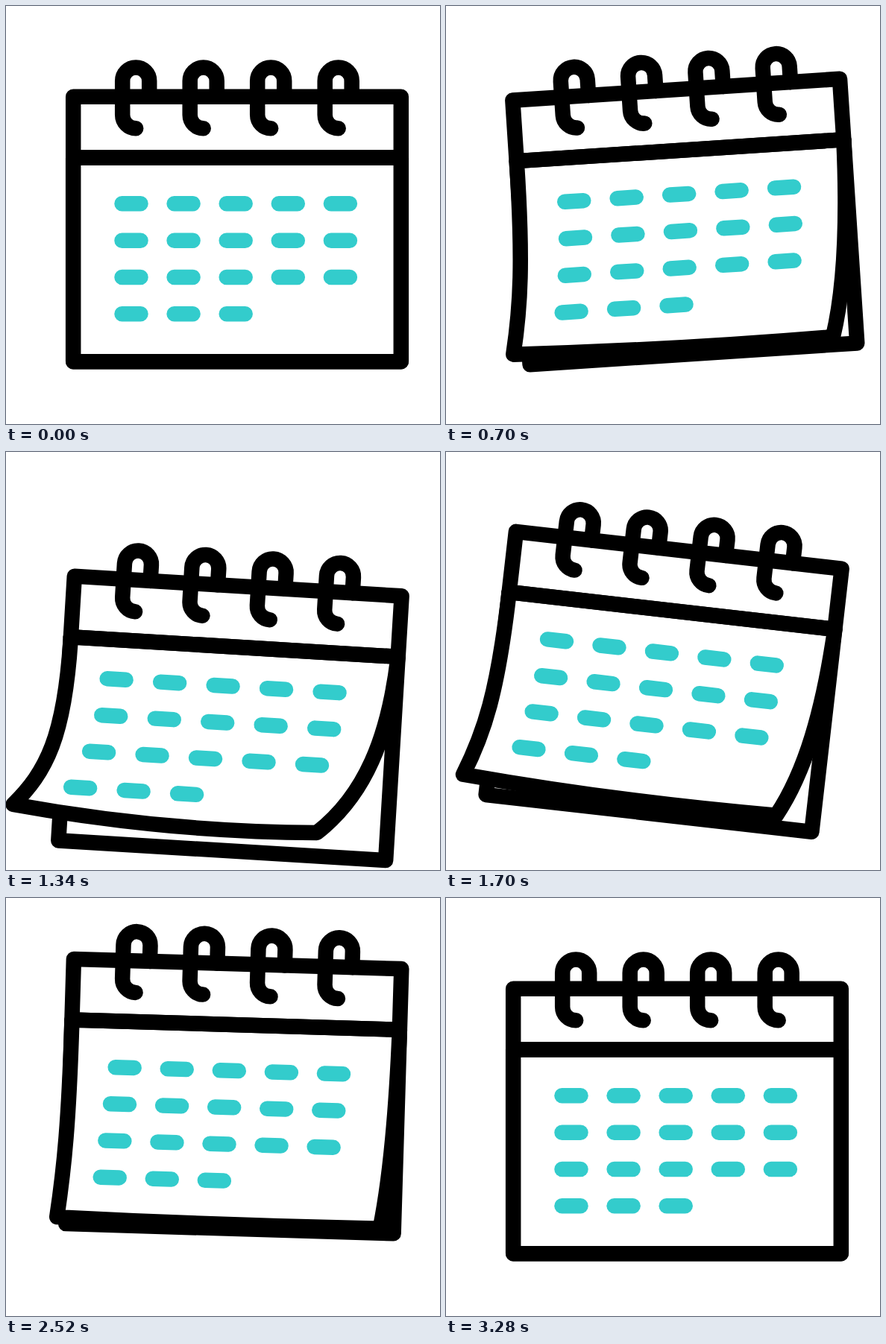
Write an HTML page that moves like this. It is 582x561 px and loops after 3.6 s.

```html
<!DOCTYPE html>
<html lang="en">
<head>
<meta charset="utf-8">
<title>Calendar</title>
<style>
  html, body { margin: 0; width: 100%; height: 100%; overflow: hidden; background: #fff; }
  svg { display: block; width: 100%; height: 100%; }
  .ink { fill: none; stroke: #000; stroke-width: 20.5; stroke-linecap: round; stroke-linejoin: round; }
  .paper { fill: #fff; }
  .day { stroke: #3cc; stroke-width: 20.5; stroke-linecap: round; }
</style>
</head>
<body>
<svg viewBox="0 0 582 561">
  <g id="calendar">
    <rect class="ink paper" x="90.2" y="121.8" width="439.6" height="355.4"/>
    <path id="page" class="ink paper"/>
    <g id="days"></g>
    <path class="ink" d="M90.2 203.5H529.8"/>
    <g id="rings"></g>
  </g>
</svg>
<script>
const LOOP = 3600;
const PIVOT = { x: 310, y: 142 };
const LEFT = 90.2, RIGHT = 529.8, FOLD = 203.5, BOTTOM = 477.2;

// [time, value] steps, eased in and out between neighbours
const RISE = [[0, 0], [400, -44], [1200, 64], [2200, -44], [3200, 0]];
const TILT = [[0, 0], [400, -6.95], [1200, 3.1], [2200, 9.9], [2800, -4.9], [3200, 0]];
const LIFT = [[400, 0], [1200, 1.33], [2200, 0]];
const SWAY = [[2200, 0], [2800, 0.44], [3280, 0]];

const $ = id => document.getElementById(id);
const mix = (a, b, k) => a + (b - a) * k;

function add(parent, className, d) {
  const path = document.createElementNS('http://www.w3.org/2000/svg', 'path');
  path.setAttribute('class', className);
  path.setAttribute('d', d);
  return parent.appendChild(path);
}

function valueAt(steps, t) {
  const next = steps.findIndex(([time]) => time > t);
  if (next === 0) return steps[0][1];
  if (next < 0) return steps[steps.length - 1][1];
  const [t0, a] = steps[next - 1], [t1, b] = steps[next];
  const u = (t - t0) / (t1 - t0);
  return mix(a, b, u * u * (3 - 2 * u));
}

// Page outline: the lower corners swing left and up, the sides follow in a curve
function pagePath(bend) {
  const left = { x: -50.5 * bend, y: -35.5 * bend };
  const right = { x: -75 * bend, y: -25 * bend };
  const side = (x, shift) => `${x + 0.35 * shift.x} ${405 + 0.42 * shift.y}`;
  const corner = (x, shift) => `${x + shift.x} ${BOTTOM + shift.y}`;
  const edge = k => `${mix(LEFT + left.x, RIGHT + right.x, k)} ` +
    `${BOTTOM + mix(left.y, right.y, k) + 9.5 * bend}`;
  return `M${LEFT} ${FOLD}C${LEFT} 339 ${side(LEFT, left)} ${corner(LEFT, left)}` +
    `C${edge(1 / 3)} ${edge(2 / 3)} ${corner(RIGHT, right)}` +
    `C${side(RIGHT, right)} ${RIGHT - 5 * bend} 313 ${RIGHT} ${FOLD}Z`;
}

for (let i = 0; i < 4; i++) {
  add($('rings'), 'ink', `M${192.2 + i * 90.5} 121.8V100.5a18 18 0 0 0-36 0V146.3a18 18 0 0 0 18 18`);
}

const days = [];
for (let i = 0; i < 18; i++) {
  const row = Math.floor(i / 5), col = i % 5;
  const el = add($('days'), 'day', `M${155.5 + col * 70.1} ${265.3 + row * 49.35}h25`);
  days.push({ el, row, col });
}

function draw(t) {
  const { x, y } = PIVOT;
  $('calendar').setAttribute('transform',
    `translate(${x} ${y + valueAt(RISE, t)}) rotate(${valueAt(TILT, t)}) translate(${-x} ${-y})`);

  const lift = valueAt(LIFT, t), sway = valueAt(SWAY, t);
  $('page').setAttribute('d', pagePath(lift + sway));

  // Lower rows travel further
  for (const { el, row, col } of days) {
    const dx = (1.2 * col - 10.5 - 3.5 * row * row) * lift - 21.3 * (row + 1) * sway;
    el.setAttribute('transform', `translate(${dx} ${-7 * lift})`);
  }
}

const start = performance.now();
function tick() {
  draw((performance.now() - start) % LOOP);
  requestAnimationFrame(tick);
}
tick();
</script>
</body>
</html>
```
